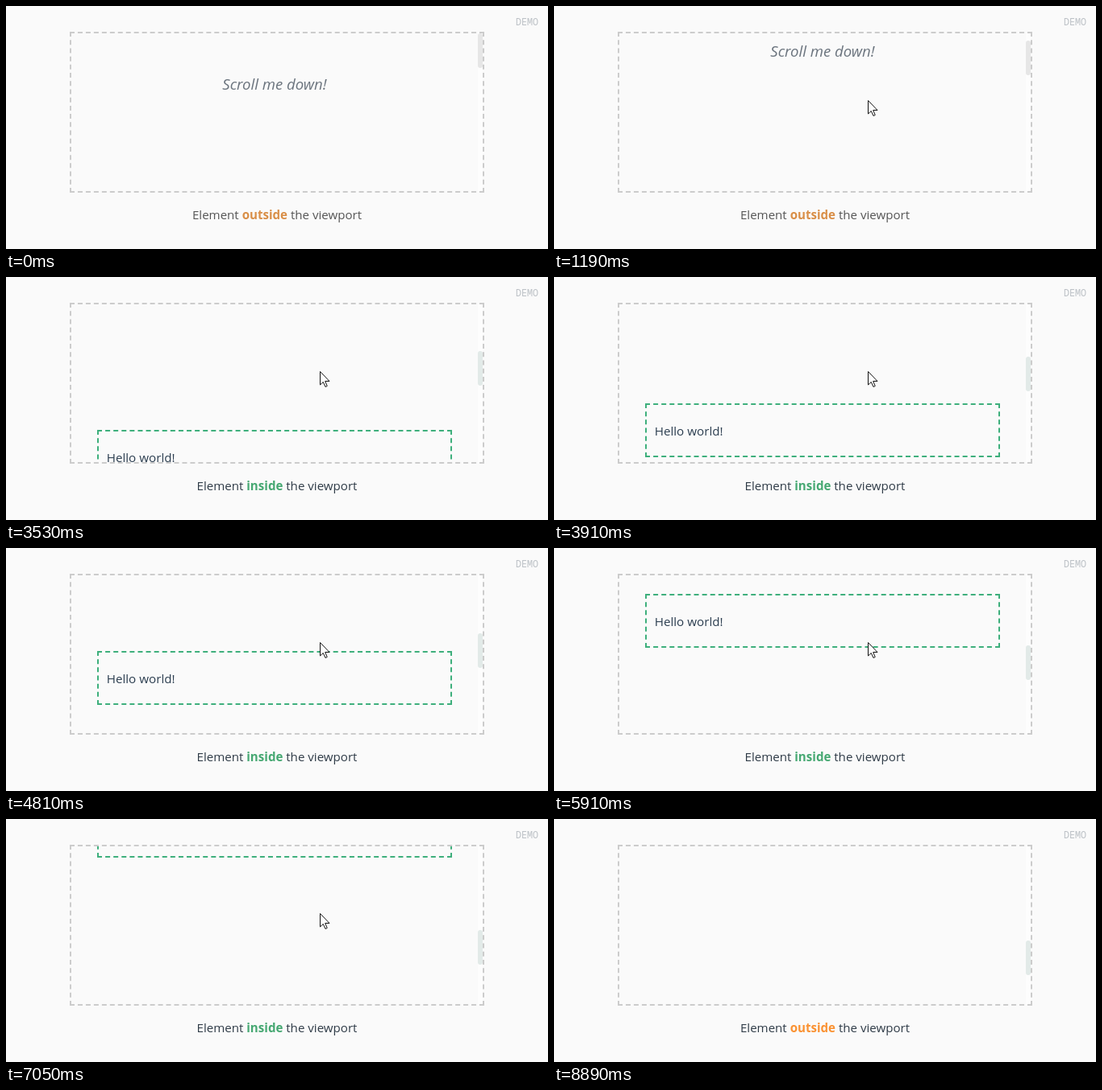
Animation of 672 by 302 pixels, one loop 9330 ms. Source, as an HTML page:

```html
<!DOCTYPE html>
<html lang="en">
<head>
<meta charset="utf-8">
<title>Viewport demo</title>
<style>
  html, body { margin: 0; width: 100%; height: 100%; overflow: hidden; background: #fafafa; }
  body { position: relative; font-family: "Open Sans", "Noto Sans", sans-serif; white-space: nowrap; }
  div, svg { position: absolute; box-sizing: border-box; }
  #tag { left: 632px; top: 9px; color: #bcc1c6; font: 11.7px/20px "Noto Sans Mono", monospace; }
  #view { left: 79px; top: 32px; width: 514px; height: 200px; border: 2px dashed #ccc; overflow: hidden; }
  #page { left: 0; top: 0; width: 504px; height: 886px; }
  #hint { left: 0; top: 51px; width: 504px; text-align: center; color: #6a737d; font-style: italic; font-size: 18.6px; line-height: 24px; }
  #box { left: 32px; top: 417px; width: 440px; height: 67px; border: 2px dashed #3eaf7c; }
  #hello { left: 9.7px; top: 22px; color: #2c3e50; font-size: 15.2px; line-height: 20px; }
  #track { left: 504px; top: 0; width: 6px; height: 196px; background: #fdfdfd; }
  #thumb { width: 6px; height: 43px; border-radius: 3px; }
  #label { left: 0; top: 249px; width: 672px; text-align: center; font-size: 15.1px; line-height: 20px; }
  #cursor { left: 0; top: 0; overflow: visible; }
</style>
</head>
<body>
<div id="tag">DEMO</div>
<div id="view">
  <div id="page">
    <div id="hint">Scroll me down!</div>
    <div id="box"><div id="hello">Hello world!</div></div>
  </div>
  <div id="track"><div id="thumb"></div></div>
</div>
<div id="label">Element <b id="state"></b> the viewport</div>
<svg id="cursor" width="13" height="21"><path d="M.5 .5V17L4.3 13.5 7 19.5 9.2 18.5 6.7 12.5H12Z" fill="#fff" stroke="#111"/></svg>
<script>
const LOOP = 9330, STEP = 29.4, BOX_TOP = 417, BOX_HEIGHT = 67, VIEW = 196, RATIO = 6.5 / STEP;
const ENTER = 40, LEAVE = 8790, GONE = 8890;

// Moments at which the mouse wheel turns by one notch
const notches = [760, 1190, 1570, 1890, 2170, 2490, 2810, 3140, 3450, 3780, 4570, 5090, 5530, 5910, 6300, 6920, 7560, 8120];

const [page, thumb, label, state, cursor] =
  ["page", "thumb", "label", "state", "cursor"].map(id => document.getElementById(id));
const easeOut = p => 1 - (1 - p) ** 2;
const clamp = p => Math.max(0, Math.min(1, p));

// Each notch is already 40 ms under way when it first shows
const turn = (t, from) => t < from ? 0 : easeOut(clamp((t - from + 40) / 190));

function cursorAt(t) {
  if (t < LEAVE) {
    const p = easeOut(clamp((t - ENTER) / 260)), q = 1 - p;
    return [427 * q * q + 740 * p * q + 389 * p * p, 238 - 121 * p];
  }
  const p = clamp((t - LEAVE + 25) / 100);
  return [389 + 55 * p, 117 + 126 * p * p];
}

function draw(t) {
  const scroll = notches.reduce((sum, from) => sum + turn(t, from), 0) * STEP;
  const top = BOX_TOP - scroll;
  const inside = top < VIEW && top + BOX_HEIGHT > 0;
  const early = top >= VIEW;

  page.style.top = -Math.round(scroll) + "px";
  thumb.style.top = Math.round(scroll * RATIO) + "px";
  thumb.style.background = early ? "#e6e6e6" : "#e2eae8";
  state.textContent = inside ? "inside" : "outside";
  state.style.color = inside ? "#46a872" : early ? "#d98f48" : "#fa9233";
  label.style.color = early ? "#555" : "#2f3b47";

  cursor.style.display = t >= ENTER && t < GONE ? "" : "none";
  const [x, y] = cursorAt(t).map(Math.round);
  cursor.style.transform = `translate(${x}px, ${y}px)`;
}

const start = performance.now();
function frame() {
  draw((performance.now() - start) % LOOP);
  requestAnimationFrame(frame);
}
frame();
</script>
</body>
</html>
```
